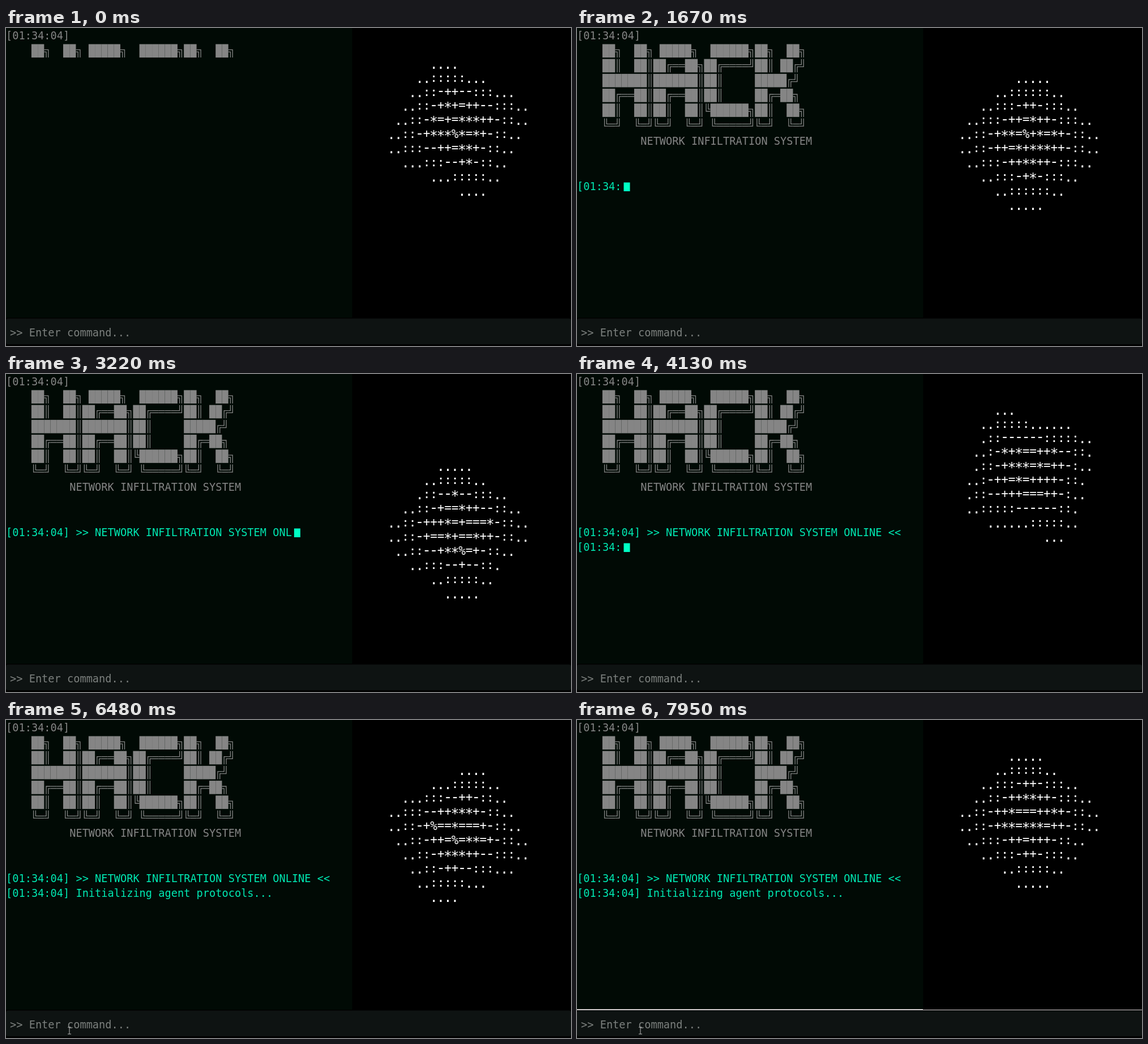
Write an HTML page with a canvas that moves like this. It is 998 by 561 pixels and loops after 8 s.

```html
<!DOCTYPE html>
<html lang="en">
<head>
<meta charset="utf-8">
<title>Network infiltration terminal</title>
<style>
  html, body { margin: 0; width: 100%; height: 100%; overflow: hidden; background: #000; }
  canvas { display: block; }
</style>
</head>
<body>
<canvas id="stage" width="998" height="561"></canvas>
<script>
const g = document.getElementById('stage').getContext('2d');
const LOOP = 8000, STEP = 69.6;
const MONO = '"DejaVu Sans Mono", monospace';
const CW = 11.22, LINE = 26.2;
const GREY = '#858585', GREEN = '#00e8b2';

const BANNER = [
  '██╗  ██╗ █████╗  ██████╗██╗  ██╗',
  '██║  ██║██╔══██╗██╔════╝██║ ██╔╝',
  '███████║███████║██║     █████╔╝',
  '██╔══██║██╔══██║██║     ██╔═██╗',
  '██║  ██║██║  ██║╚██████╗██║  ██╗',
  '╚═╝  ╚═╝╚═╝  ╚═╝ ╚═════╝╚═╝  ╚═╝'
];
// Direction of the horizontal and vertical arm of each corner
const CORNERS = { '╗': [-1, 1], '╔': [1, 1], '╝': [-1, -1], '╚': [1, -1] };

const STAMP = '[01:34:04]';
const SCRAMBLE = '!#<>-_/[]{};=+*^';
// Typing pace as [time, characters shown]
const LINES = [
  { text: STAMP + ' >> NETWORK INFILTRATION SYSTEM ONLINE <<', y: 286,
    pace: [[900, 0], [965, 1.1], [1740, 8.6], [2380, 29.6], [2590, 33.3], [3220, 45.8], [3530, 51]] },
  { text: STAMP + ' Initializing agent protocols...', y: 312,
    pace: [[3720, 0], [4270, 10.6], [5090, 27.1], [5920, 37.4], [6300, 42]] }
];

// Size, and height of the glyph's middle below the middle of its row
const GLYPHS = {
  '.': [24, 8], ':': [22, 2], '-': [26, 0], '+': [21, 0],
  '=': [21, 0], '*': [25, 0], '%': [21, 0], '@': [20, 0]
};

function text(str, x, y, color) {
  g.font = '18.64px ' + MONO;
  g.textAlign = 'left';
  g.fillStyle = color;
  [...str].forEach((c, i) => { if (c !== ' ') g.fillText(c, x + i * CW, y); });
}

function path(...pts) {
  g.beginPath();
  pts.forEach(([x, y]) => g.lineTo(x, y));
  g.stroke();
}

function boxGlyph(c, x, y) {
  const h = 23.6, d = 1.9, cx = x + CW / 2, cy = y + h / 2;
  if (c === '█') {
    g.fillRect(x, y, CW, h);
  } else if (c === '═') {
    for (const s of [-d, d]) path([x, cy + s], [x + CW, cy + s]);
  } else if (c === '║') {
    for (const s of [-d, d]) path([cx + s, y], [cx + s, y + h]);
  } else if (CORNERS[c]) {
    const [a, b] = CORNERS[c];
    const ex = a < 0 ? x : x + CW, ey = b < 0 ? y : y + h;
    for (const s of [-d, d]) path([ex, cy + b * s], [cx + a * s, cy + b * s], [cx + a * s, ey]);
  }
}

function banner(t) {
  const shown = 1 + Math.floor(t / 110);
  g.fillStyle = GREY;
  g.strokeStyle = GREY;
  g.lineWidth = 1.3;
  BANNER.slice(0, shown).forEach((row, r) =>
    [...row].forEach((c, i) => boxGlyph(c, (i + 4) * CW, 28.5 + r * LINE)));
  if (shown > BANNER.length) text('NETWORK INFILTRATION SYSTEM', 10 * CW, 206, GREY);
}

function along(pace, t) {
  const i = pace.findIndex(p => p[0] > t);
  if (i < 0) return pace[pace.length - 1][1];
  if (i === 0) return 0;
  const [t0, n0] = pace[i - 1], [t1, n1] = pace[i];
  return n0 + (n1 - n0) * (t - t0) / (t1 - t0);
}

function typeLine({ text: full, y, pace }, t) {
  if (t < pace[0][0]) return;
  const n = along(pace, t), count = Math.floor(n);
  let str = full.slice(0, count);
  if (count >= full.length) return text(full, 0, y, GREEN);
  // A new character starts scrambled and then settles
  if (count && n % 1 < 0.3) str = str.slice(0, -1) + SCRAMBLE[count % SCRAMBLE.length];
  text(str, 0, y, GREEN);
  g.fillStyle = '#00ffc4';
  g.fillRect(count * CW + 4, y - 13.5, 11, 15.5);
}

function noise(a, b, c) {
  const s = Math.sin(a * 12.9898 + b * 78.233 + c * 37.719) * 43758.5453;
  return s - Math.floor(s);
}

function shade(d, n) {
  if (d > 0.83) return '.';
  if (d > 0.64) return ':';
  if (d > 0.52) return '-';
  if (d > 0.38) return n > 0.85 ? '*' : '+';
  if (n > 0.995) return '@';
  if (n > 0.96) return '%';
  return n > 0.55 ? '*' : n > 0.16 ? '=' : '+';
}

function drawGlyph(c, x, y) {
  const [size, drop] = GLYPHS[c];
  g.font = size + 'px ' + MONO;
  const m = g.measureText(c);
  g.fillText(c, x, y + drop + (m.actualBoundingBoxAscent - m.actualBoundingBoxDescent) / 2);
}

// A soft-cornered square spinning on a character grid; it bobs by whole rows
function spinner(t, step) {
  const pitchX = 12.47, pitchY = 24.95, half = 102;
  const mid = Math.floor(6.8 + 2.55 * Math.cos((t - 980) / 2045 * 2 * Math.PI)) + 0.5;
  const turn = (73 - 45 + 171.7 * t / 1000) * Math.PI / 180;
  const cos = Math.cos(turn), sin = Math.sin(turn);
  g.fillStyle = '#fff';
  g.textAlign = 'center';
  for (let r = 0; r < 16; r++) {
    for (let c = -1; c < 21; c++) {
      const x = (c - 9.5) * pitchX, y = (r - mid) * pitchY;
      const u = (x * cos + y * sin) / half, v = (y * cos - x * sin) / half;
      const d = Math.pow(u ** 6 + v ** 6, 1 / 6);
      if (d < 1) drawGlyph(shade(d, noise(c, r, step)), 680.8 + c * pitchX, 61.6 + r * pitchY);
    }
  }
}

function pointer(x, y) {
  g.strokeStyle = '#b8b8b8';
  g.lineWidth = 1;
  path([x, y - 6], [x, y + 6]);
  for (const s of [-6, 6]) path([x - 3, y + s], [x + 3, y + s]);
}

function inputBar(t) {
  g.fillStyle = '#0e1312';
  g.beginPath();
  g.roundRect(0, 512.5, 998, 45.5, 4);
  g.fill();
  text('>> Enter command...', 7, 544, '#7c807e');
  if (t > 7250) {
    g.fillStyle = '#d4ced0';
    g.fillRect(0, 510, 611, 2);
    g.fillRect(611, 511, 387, 1);
  }
}

function draw(now) {
  const step = Math.floor((now % LOOP + 8) / STEP);
  const t = Math.min(step * 69.75, LOOP);
  g.fillStyle = '#000';
  g.fillRect(0, 0, 998, 561);
  g.fillStyle = '#010a05';
  g.fillRect(0, 0, 611.5, 511);
  text(STAMP, 0, 20, GREY);
  banner(t);
  LINES.forEach(line => typeLine(line, t));
  spinner(t, step);
  inputBar(t);
  if (t > 2310 && t < 2660) pointer(982 - (t - 2380) * 0.08, 547 + Math.max(0, t - 2450) * 0.08);
  if (t > 5450) pointer(112, 548 + Math.max(0, 5700 - t) * 0.06);
}

const start = performance.now();
function tick() {
  draw(performance.now() - start);
  requestAnimationFrame(tick);
}
tick();
</script>
</body>
</html>
```
